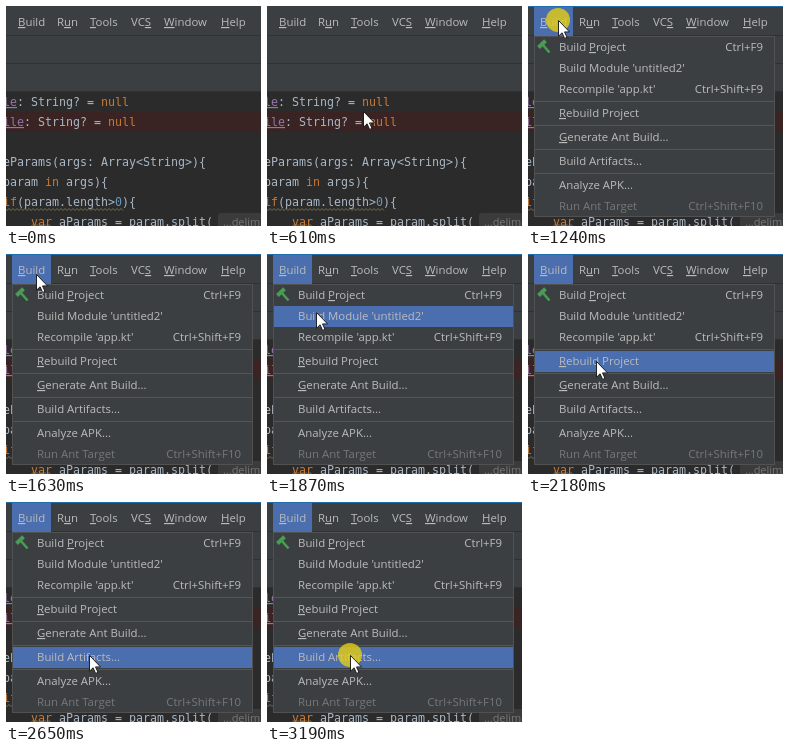
An HTML page that plays this animation: 255x220 px, repeating every 3.35 s.

```html
<!DOCTYPE html>
<html lang="en">
<head>
<meta charset="utf-8">
<title>Build menu</title>
<style>
  html, body { margin: 0; width: 255px; height: 220px; overflow: hidden; background: #2b2b2b; }
  svg { display: block; }
  text { white-space: pre; }
  .ui { font: 11.4px "Open Sans", "Noto Sans", sans-serif; fill: #bbb; }
  .ui.off { fill: #777; }
  .code { font: 11.63px "DejaVu Sans Mono", monospace; fill: #a9b7c6; }
  .hint { font: 11px "Open Sans", sans-serif; fill: #787878; }
  .key { fill: #cc7832; }
  .num { fill: #6897bb; }
  .prop { fill: #9876aa; text-decoration: underline; }
  .mn { text-decoration: underline; }
  .wave { fill: none; stroke: #8c8256; stroke-width: .8; }
</style>
</head>
<body>
<svg id="stage" width="255" height="220" viewBox="0 0 255 220">
  <rect width="255" height="220" fill="#2b2b2b"/>
  <rect width="255" height="86" fill="#3c3f41"/>
  <path d="M0 29.5H255M0 57.5H255M0 85.5H255" stroke="#2f3133"/>
  <rect y="106" width="255" height="20" fill="#3a2323"/>
  <g id="code"></g>
  <g id="waves"></g>
  <rect x="212" y="207" width="50" height="16" rx="3" fill="#3b3b3b"/>
  <text class="hint" x="217" y="220">…delimiters:</text>

  <rect id="barHit" x="6" y="1" width="39" height="29" fill="#4b6eaf"/>
  <g id="bar"></g>

  <g id="menu">
    <rect width="255" height="1" fill="#1e6ca8"/>
    <rect x="6.5" y="30.5" width="240" height="180" fill="#3c3f41" stroke="#515151"/>
    <path d="M7 95.5H246M7 119.5H246M7 143.5H246M7 167.5H246" stroke="#555"/>
    <rect id="hit" x="7" width="239" height="21" fill="#4b6eaf"/>
    <g stroke="#499c54" fill="none">
      <path d="M10.5 41.5L17.5 34.8" stroke-width="4"/>
      <path d="M14.5 38.5L21.5 46.5" stroke-width="2.6"/>
    </g>
    <g id="items"></g>
  </g>

  <circle id="click" r="12" fill="#e8d010" opacity=".78"/>
  <path id="cursor" d="M.5 .5V16.2L4.1 12.8L6.6 18.4L9 17.4L6.5 11.9H11.5Z"
        fill="#fff" stroke="#111" stroke-width=".9"/>
</svg>
<script>
const $ = id => document.getElementById(id);
const LOOP = 3350, OPEN = 1240;

const addText = (group, cls, x, y, html, anchor = 'start') =>
  $(group).insertAdjacentHTML('beforeend',
    `<text class="${cls}" x="${x}" y="${y}" text-anchor="${anchor}">${html}</text>`);

// An underscore marks the mnemonic letter.
const mnemonic = s => s.replace(/_(.)/, '<tspan class="mn">$1</tspan>');
const span = (cls, s) => `<tspan class="${cls}">${s}</tspan>`;
const key = s => span('key', s);

[
  [-10, 100, span('prop', 'ile') + ': String? = ' + key('null')],
  [-3, 120, span('prop', 'ile') + ': String? = ' + key('null')],
  [-3, 160, 'eParams(args: Array&lt;String&gt;){'],
  [-3, 180, 'param ' + key('in') + ' args){'],
  [-3, 200, key('if') + '(param.length&gt;' + span('num', '0') + '){'],
  [25, 220, key('var') + ' aParams = param.split(']
].forEach(([x, y, html]) => addText('code', 'code', x, y, html));

function addWave(x, y, width) {
  const d = `M${x} ${y}` + 'l2 -2l2 2'.repeat(Math.round(width / 4));
  $('waves').insertAdjacentHTML('beforeend', `<path class="wave" d="${d}"/>`);
}
addWave(-3, 204.5, 120);
addWave(25, 220.5, 20);

[['_Build', 12], ['R_un', 51], ['_Tools', 84], ['VC_S', 125], ['_Window', 158], ['_Help', 215]]
  .forEach(([label, x]) => addText('bar', 'ui', x, 20, mnemonic(label)));

// Top of row, label, shortcut.
const items = [
  [31, 'Build _Project', 'Ctrl+F9'],
  [52, "Build Module 'untitled2'", ''],
  [73, "Recompile 'app.kt'", 'Ctrl+Shift+F9'],
  [97, '_Rebuild Project', ''],
  [121, '_Generate Ant Build...', ''],
  [145, 'Build Artifacts...', ''],
  [169, 'Analyze APK...', ''],
  [190, 'Run Ant Target', 'Ctrl+Shift+F10']
];
items.forEach(([top, label, keys], i) => {
  const cls = i === items.length - 1 ? 'ui off' : 'ui';
  addText('items', cls, 31, top + 14, mnemonic(label));
  if (keys) addText('items', cls, 235, top + 14, keys, 'end');
});

// Pointer tip: time, x, y.
const path = [
  [370, 145, 159], [450, 134, 148], [530, 116, 128], [610, 96, 105],
  [690, 76, 82], [770, 55, 58], [850, 38, 38], [920, 32, 22], [1000, 30, 14],
  [1550, 30, 15], [1630, 30, 20], [1710, 35, 32], [1790, 42, 45],
  [1870, 49, 58], [1950, 55, 72], [2030, 60, 84], [2100, 64, 97],
  [2180, 68, 107], [2260, 72, 116], [2340, 76, 124], [2420, 79, 132],
  [2500, 82, 140], [2570, 85, 147], [2650, 83, 153]
];

const show = (id, on) => $(id).setAttribute('visibility', on ? 'inherit' : 'hidden');

function draw(t) {
  const spot = path.filter(p => p[0] <= t).pop();
  const open = t >= OPEN;
  show('cursor', spot);
  show('menu', open);
  show('barHit', open);
  show('click', (open && t < 1400) || t >= 3190);
  if (!spot) return show('hit', false);

  const [, x, y] = spot;
  $('cursor').setAttribute('transform', `translate(${x} ${y})`);
  $('click').setAttribute('cx', x);
  $('click').setAttribute('cy', y);
  const row = items.filter(item => item[0] <= y).pop();
  show('hit', open && row);
  if (row) $('hit').setAttribute('y', row[0]);
}

const start = performance.now();
function tick() {
  draw((performance.now() - start) % LOOP);
  requestAnimationFrame(tick);
}
draw(0);
requestAnimationFrame(tick);
</script>
</body>
</html>
```
